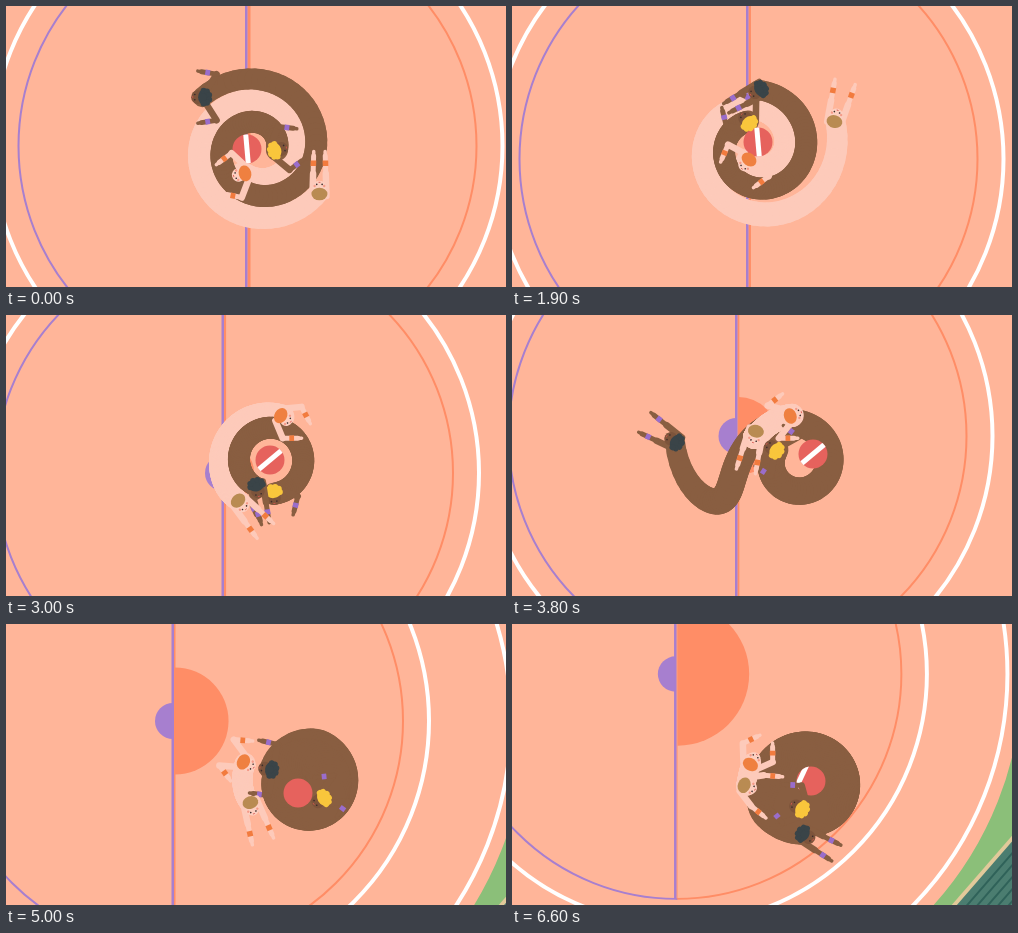
An HTML page with a canvas for the animation above (6.7 s loop, 500 by 281 pixels).

```html
<!DOCTYPE html>
<html>
<head>
<meta charset="utf-8">
<title>Ball game</title>
<style>
html, body { margin: 0; width: 100%; height: 100%; overflow: hidden; background: #ffb599; }
canvas { display: block; width: 100vw; height: 100vh; }
</style>
</head>
<body>
<canvas width="500" height="281"></canvas>
<script>
const ctx = document.querySelector('canvas').getContext('2d');
const LOOP = 6700, STEP = 100, SEGMENTS = 90, RAD = Math.PI / 180, TAU = Math.PI * 2;
const TIMES = [0, 1000, 1900, 3000, 3800, 5000, 6600];
const PURPLE = '#a77fcf', ORANGE = '#ff8d66', BROWN = '#895e41', PINK = '#fdcaba';

// Court centre, ball, spiral centre at each of TIMES
const stage = [
  [241.5, 140, 241, 143, 252, 143],
  [266.5, 141, 257, 137, 250, 142],
  [236.5, 153, 246, 136, 245, 142],
  [218, 158, 264, 145, 264, 145],
  [225.5, 121, 301, 139, 286, 148],
  [168, 97, 292, 169, 301, 159],
  [164.5, 50, 299, 157, 297, 162]
];

// Poses: angle and radius around the spiral centre, facing angle, spread of the arms
const dark = {
  hair: '#3a4448', dark: true, stretch: 14,
  poses: [[223, 76, 180, 80], [45, 65, -10, 6], [-88, 58, -209, 8], [-244, 30, -283, 6],
    [-170, 125, -148, 18], [-160, 40, -170, 60], [-265, 49, -330, 14]]
};
const yellow = {
  hair: '#f9c63c', dark: true, stretch: 6,
  poses: [[723, 19, -15, 32], [563, 25, -145, 70], [251, 28, -130, 22], [84, 34, -275, 38],
    [210, 27, -145, 75], [407, 22, -210, 100], [112, 24, -153, 27]]
};
const brunette = {
  hair: '#b98b52', stretch: 17,
  poses: [[35, 75, -90, 8], [-126, 82, -250, 12], [-380, 83, -435, 15], [-234, 52, -312, 16],
    [-145, 52, -256, 14], [-201, 60, -288, 16], [-180, 63, -338, 36]]
};
const ginger = {
  hair: '#ef8040', stretch: 5,
  poses: [[481, 29, 167, 32], [315, 32, -105, 50], [125, 16, -232, 50], [-74, 45, -329, 17],
    [-97, 48, -379, 95], [-162, 65, -331, 100], [-158, 62, -418, 15]]
};

const mix = (a, b, k) => a + (b - a) * k;
const ramp = (t, from, length) => Math.max(0, Math.min(1, (t - from) / length));
const smooth = k => k * k * (3 - 2 * k);
const hop = (t, from, length) => Math.sin(Math.PI * ramp(t, from, length));

function track(rows, t) {
  let i = 0;
  while (i < TIMES.length - 2 && t >= TIMES[i + 1]) i++;
  const k = ramp(t, TIMES[i], TIMES[i + 1] - TIMES[i]);
  return rows[i].map((v, j) => mix(v, rows[i + 1][j], k));
}

function disc(x, y, r, color, from = 0, to = TAU) {
  ctx.fillStyle = color;
  ctx.beginPath();
  ctx.arc(x, y, r, from, to);
  ctx.fill();
}
function ring(r, width, color, from = 0, to = TAU) {
  ctx.strokeStyle = color;
  ctx.lineWidth = width;
  ctx.beginPath();
  ctx.arc(0, 0, r, from, to);
  ctx.stroke();
}
function stroke(points, width, color) {
  ctx.strokeStyle = color;
  ctx.lineWidth = width;
  ctx.beginPath();
  points.forEach(p => ctx.lineTo(...p));
  ctx.stroke();
}
function bar(x, y, w, h, color) {
  ctx.fillStyle = color;
  ctx.fillRect(x, y, w, h);
}

function drawCourt(t, x, y) {
  const q = Math.PI / 2, zoom = 1 - .018 * ramp(t, 5000, 1600);
  bar(0, 0, 500, 281, '#ffb599');
  ctx.save();
  ctx.translate(x, y);
  ctx.scale(zoom, zoom);
  ring(430, 156, '#8bbf79');
  drawStand();
  ring(337, 4, '#fff');
  ring(255, 4, '#fff');
  ring(229, 2, ORANGE, -q, q);
  ring(229, 2, PURPLE, q, -q);
  disc(1, 0, 73 * ramp(t, 600, 6000), ORANGE, -q, q);
  disc(-1, 0, 18 * ramp(t, 1900, 900), PURPLE, q, -q);
  bar(0, -229, mix(3, 1, t / 6600), 458, ORANGE);
  bar(-2.5, -229, 2.5, 458, PURPLE);
  ctx.restore();
}
function drawStand() {
  ctx.save();
  ctx.translate(310, 201);
  ctx.rotate(-49 * RAD);
  bar(-200, 0, 400, 200, '#e2c99a');
  bar(-200, 4, 400, 200, '#4b7d70');
  for (let y = 11; y < 90; y += 8) bar(-200, y, 400, 2, '#2f6259');
  ctx.restore();
}

function drawBall(t, x, y) {
  const angle = mix(85, -40, smooth(ramp(t, 1900, 1100))) - 25 * ramp(t, 5000, 1600);
  const offset = 20 * (hop(t, 0, 1900) - hop(t, 3800, 3400));
  ctx.save();
  ctx.translate(x, y);
  disc(0, 0, 14.5, '#e6625d');
  ctx.clip();
  ctx.rotate(angle * RAD);
  bar(-20, offset - 2.5, 40, 5, '#fff');
  ctx.restore();
}

// A spiral from one player to the other; it bends backwards while it uncoils
function drawRope(t, cx, cy, first, second, width, color) {
  const [a0, r0] = track(first.poses, t), [a1, r1] = track(second.poses, t);
  const power = mix(1.2, 3, ramp(t, 3000, 800));
  const bend = 2.25 * Math.max(0, 1 - Math.abs(t - 3800) / 900);
  const point = u => {
    const a = RAD * (a0 + (a1 - a0) * (u - bend * u * (1 - u) ** 2));
    const r = mix(r1, r0, (1 - u) ** power);
    return [cx + r * Math.cos(a), cy + r * Math.sin(a)];
  };
  for (let i = 0; i < SEGMENTS; i++) {
    const u = i / SEGMENTS;
    stroke([point(u), point(u + 1 / SEGMENTS)], mix(20, width, ramp(u, 0, .15)), color);
  }
}

function drawArm(reach, spread, side, skin, band) {
  const hx = reach * Math.cos(spread), hy = side * reach * Math.sin(spread);
  const sx = -4, sy = side * 7, dx = hx - sx, dy = hy - sy, d = Math.hypot(dx, dy);
  const bend = side * Math.sqrt(Math.max(0, 19 * 19 - d * d / 4));
  const ex = sx + dx / 2 - dy / d * bend, ey = sy + dy / 2 + dx / d * bend;
  const along = k => [mix(ex, hx, k), mix(ey, hy, k)];
  stroke([[sx, sy], [ex, ey]], 6.5, skin);
  stroke([[ex, ey], along(.8)], 5, skin);
  stroke([along(.7), [hx, hy]], 3.5, skin);
  ctx.lineCap = 'butt';
  stroke([along(.35), along(.6)], 5.6, band);
  ctx.lineCap = 'round';
}

function drawPlayer(t, cx, cy, player) {
  const [angle, radius, face, spread] = track(player.poses, t);
  const skin = player.dark ? BROWN : PINK, band = player.dark ? '#9a6dcb' : '#f27b3e';
  const reach = 24 + player.stretch * Math.cos(spread * RAD);
  ctx.save();
  ctx.translate(cx + radius * Math.cos(angle * RAD), cy + radius * Math.sin(angle * RAD));
  ctx.rotate(face * RAD);
  for (const side of [-1, 1]) drawArm(reach, spread * RAD, side, skin, band);
  disc(4.5, 0, 6.8, player.dark ? '#7d543b' : '#fdcfc0');
  ctx.fillStyle = player.hair;
  ctx.beginPath();
  ctx.ellipse(-2, 0, 6.3, 8, 0, 0, TAU);
  ctx.fill();
  if (player.dark) for (let a = 80; a <= 280; a += 40) {
    disc(5 * Math.cos(a * RAD) - 2, 6.5 * Math.sin(a * RAD), 3, player.hair);
  }
  for (const side of [-1, 1]) {
    disc(7.6, side * 2.7, .8, '#3b2b2b');
    if (!player.dark) disc(6, side * 4.8, 1.2, '#f49a88');
  }
  stroke([[9.7, -.7], [9.7, .7]], .8, '#d8574f');
  ctx.restore();
}

function draw(t) {
  const [x, y, bx, by, cx, cy] = track(stage, t);
  const grow = smooth(ramp(t, 3000, 3000));
  ctx.lineCap = ctx.lineJoin = 'round';
  drawCourt(t, x, y);
  const ropes = [
    () => drawRope(t, cx, cy, brunette, ginger, mix(24, 19, grow), PINK),
    () => drawRope(t, cx, cy, dark, yellow, mix(22, 53, grow), BROWN)
  ];
  if (t > 3300) ropes.reverse();
  ropes.forEach(paint => paint());
  drawBall(t, bx, by);
  for (const player of [yellow, ginger, dark, brunette]) drawPlayer(t, cx, cy, player);
}

const start = performance.now();
function frame() {
  const t = (performance.now() - start) % LOOP;
  draw(Math.floor(t / STEP) * STEP);
  requestAnimationFrame(frame);
}
frame();
</script>
</body>
</html>
```
